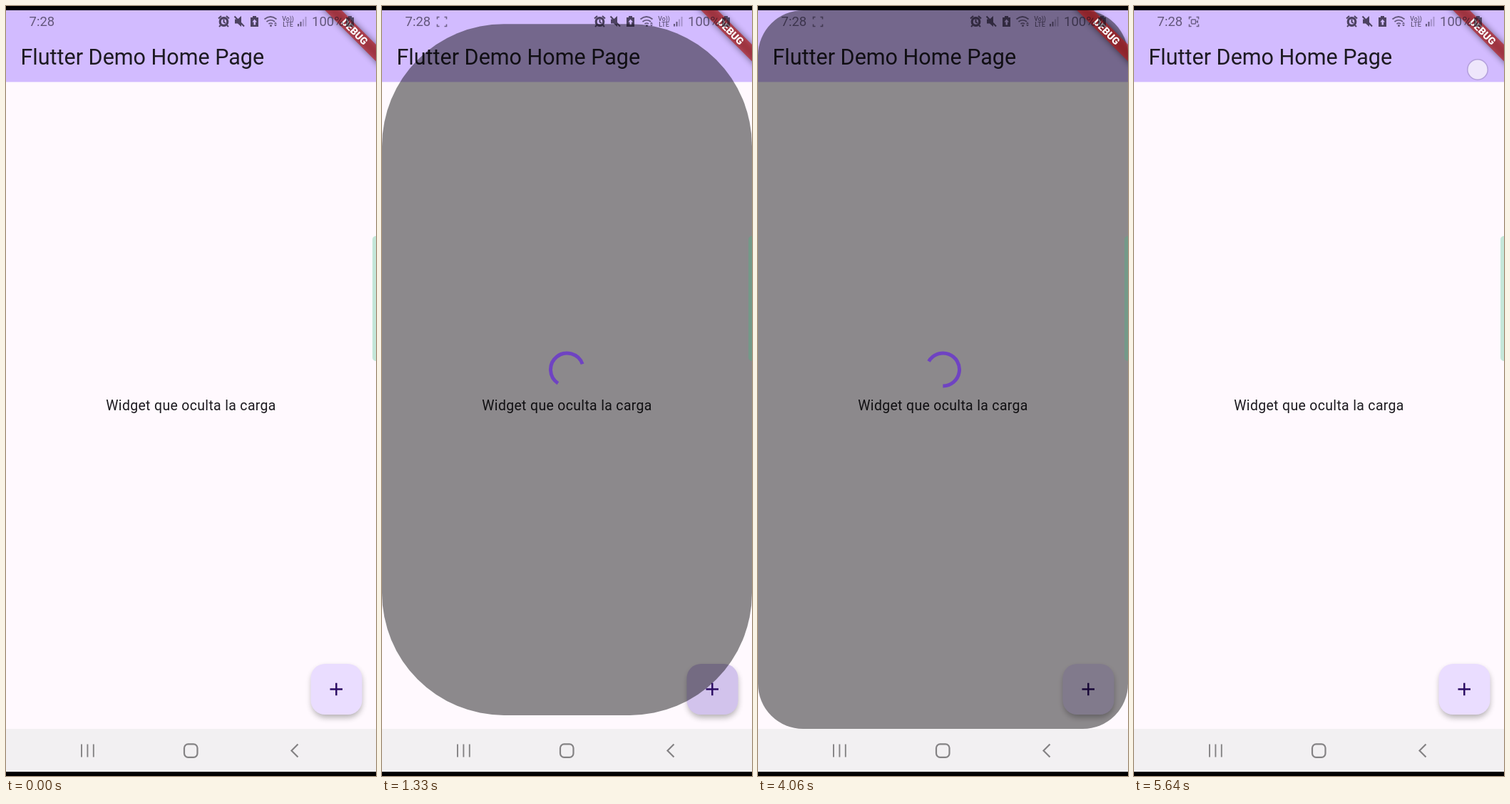
Animation of 519 by 1078 pixels, one loop 5.67 s. Source, as an HTML page:

```html
<!DOCTYPE html>
<html lang="es">
<head>
<meta charset="utf-8">
<title>Flutter Demo Home Page</title>
<style>
  html, body { margin: 0; width: 100%; height: 100%; overflow: hidden; background: #000; }
  svg { display: block; width: 519px; height: 1078px; font-family: Roboto, sans-serif; }
  .line { fill: none; stroke: currentColor; }
  #status { color: #15101f; fill: #15101f; }
  #nav { color: #848284; }
</style>
</head>
<body>
<svg viewBox="0 0 519 1078">
  <defs>
    <clipPath id="reveal"><rect id="hole"/></clipPath>
    <clipPath id="app"><rect y="6" width="519" height="1006"/></clipPath>
    <filter id="soft" x="-40%" y="-40%" width="180%" height="180%"><feGaussianBlur stdDeviation="4"/></filter>
    <filter id="glow" x="-20%" y="-150%" width="140%" height="400%"><feGaussianBlur stdDeviation="5"/></filter>
  </defs>

  <rect width="519" height="1078"/>
  <rect y="6" width="519" height="1006" fill="#fff9fe"/>
  <rect y="6" width="519" height="100.4" fill="#d2bbff"/>
  <text x="20.5" y="82" font-size="30.5" fill="#1d1a22">Flutter Demo Home Page</text>
  <text x="259.5" y="566" font-size="19.45" letter-spacing=".35" text-anchor="middle" fill="#1d1b20">Widget que oculta la carga</text>

  <rect x="429" y="926" width="70" height="70" rx="20" opacity=".3" filter="url(#soft)"/>
  <rect x="427.500" y="921" width="72" height="71" rx="20" fill="#eaddff"/>
  <rect id="ink" x="427.500" y="921" width="72" height="71" rx="20" fill="#21005d" opacity="0"/>
  <path d="M454.500 956.500h17.500M463.300 947.700v17.500" stroke="#2c0d64" stroke-width="2.500"/>

  <g clip-path="url(#app)">
    <g clip-path="url(#reveal)">
      <rect y="6" width="519" height="1006" opacity=".45"/>
      <path id="arc" fill="none" stroke="#6f43c2" stroke-width="5"/>
    </g>
    <g transform="translate(519 6) rotate(45)">
      <rect x="-80" y="34" width="160" height="16.600" opacity=".5" filter="url(#glow)"/>
      <rect x="-80" y="34" width="160" height="16.600" fill="#b71c1c" fill-opacity=".66"/>
      <text y="47.300" font-size="14.100" font-weight="900" text-anchor="middle" fill="#fff">DEBUG</text>
    </g>
  </g>
  <path d="M519 322h-1q-4 1-4 5v165q0 4 4 5h1z" fill="#3cbe82" fill-opacity=".3"/>

  <g id="status">
    <g opacity=".58">
      <text x="32.5" y="28.3" font-size="18.5">7:28</text>
      <text x="429" y="28.3" font-size="18.5">100%</text>
    </g>
    <g id="rec" opacity=".52" stroke-width="1.6">
      <path class="line" d="M77.500 18.500v-3h3M87.500 15.500h3v3M90.500 25.500v3h-3M80.500 28.500h-3v-3"/>
      <g id="cam"><rect class="line" x="80.500" y="19" width="6" height="6" rx="1"/><path d="M87 22l3-2.500v5z"/></g>
    </g>
    <g opacity=".7">
      <circle class="line" cx="305.5" cy="22" r="5.300" stroke-width="3.200"/>
      <path class="line" d="M305.500 18.500v4l2.500 1.500M298 17.500l4-3.500M313 17.500l-4-3.500M301 27l-2 2M310 27l2 2" stroke-width="2"/>
      <path d="M321 18.500h4l5-4.500v15l-5-4.500h-4z"/>
      <path class="line" d="M320.500 14.500l13.500 14" stroke-width="2"/>
      <path fill-rule="evenodd" d="M346 14h5v2h3v13h-11v-13h3zM348.500 18.500l-3 4h2v4h2.500v-4h2z"/>
    </g>
    <g opacity=".58">
      <path class="line" d="M362.500 18.500q8.500-7 17 0M365.500 22q6-4.500 11.500 0M368.500 25q3-2 5.500 0" stroke-width="1.700"/>
      <circle cx="371.500" cy="27.500" r="1.500"/>
      <path d="M376 25l2-2.500 2 2.500zM376 26l2 2.500 2-2.500z"/>
      <text x="395.500" y="20.500" font-size="8.800" font-weight="500" text-anchor="middle">Vo))</text>
      <text x="395.500" y="28.600" font-size="9" font-weight="500" text-anchor="middle">LTE</text>
      <path d="M409 25h2v3.500h-2zM412.500 22h2v6.500h-2z"/>
      <path d="M416 18.500h2v10h-2zM419.500 15h2v13.500h-2z" opacity=".4"/>
    </g>
    <path opacity=".62" fill-rule="evenodd" d="M480 14h5v2h3v13h-11v-13h3zM483.500 18l-3.500 5h2.200l-.7 4 3.500-5h-2.200z"/>
  </g>

  <g id="nav">
    <rect y="1012" width="519" height="60" fill="#f2f0f2"/>
    <path class="line" d="M106 1033.500v18M114.400 1033.500v18M122.800 1033.500v18" stroke-width="1.900"/>
    <rect class="line" x="250" y="1033.300" width="18.500" height="18.500" rx="5.500" stroke-width="2.200"/>
    <path class="line" d="M409.500 1033.500l-9 9 9 9" stroke-width="2.200"/>
  </g>
  <g id="touch" visibility="hidden">
    <circle r="15" fill="#6d6187" opacity=".3"/>
    <circle r="13.500" fill="#eee6fb"/>
  </g>
</svg>

<script>
const LOOP = 5670;
const $ = id => document.getElementById(id);
const set = (id, attrs) => { for (const k in attrs) $(id).setAttribute(k, attrs[k]); };
const clamp = v => Math.min(1, Math.max(0, v));
const ramp = (t, from, to) => clamp((t - from) / (to - from));
const show = on => on ? 'visible' : 'hidden';

// cubic-bezier(.4, 0, .2, 1)
function ease(x) {
  let lo = 0, hi = 1;
  for (let i = 0; i < 24; i++) {
    const s = (lo + hi) / 2, u = 1 - s;
    if (1.2 * u * u * s + .6 * u * s * s + s * s * s < x) lo = s; else hi = s;
  }
  return 3 * (1 - lo) * lo * lo + lo ** 3;
}

// The scrim grows as a circle, then loses its rounding at the screen edges.
function drawScrim(t) {
  const p = ramp(t, 1133.5, 1433.5) - ramp(t, 4023, 4323);
  const size = 1470 * p, w = Math.min(519, size), h = Math.min(1006, size);
  const r = Math.min(500 * (1 - p), w / 2, h / 2);
  set('hole', { x: 259.5 - w / 2, y: 509 - h / 2, width: w, height: h, rx: r, ry: r });
}

// Material indeterminate spinner: 1333 ms sweep, 2222 ms rotation.
function drawSpinner(t) {
  const phase = (t + 4350) / 1333 % 1;
  const head = 270 * ease(clamp(phase * 2)), tail = 270 * ease(clamp(phase * 2 - 1));
  const turn = 189.5 + (t - 1330) / 2222 * 360;
  const start = -90 + tail + phase * 90 + turn;
  const sweep = Math.max(head - tail, .1);
  const point = deg => {
    const a = deg * Math.PI / 180;
    return `${259.5 + 23 * Math.cos(a)} ${509 + 23 * Math.sin(a)}`;
  };
  set('arc', { d: `M${point(start)}A23 23 0 ${+(sweep > 180)} 1 ${point(start + sweep)}` });
}

function draw(t) {
  drawScrim(t);
  drawSpinner(t);
  set('ink', { opacity: .12 * (ramp(t, 1080, 1180) - ramp(t, 1330, 1500)) });
  set('rec', { visibility: show(t >= 450) });
  set('cam', { opacity: +(t % 1000 >= 500) });
  set('touch', {
    visibility: show(t >= 5580),
    transform: `translate(482 ${45 + 44 * ramp(t, 5580, 5640)})`
  });
}

function tick() {
  draw(performance.now() % LOOP);
  requestAnimationFrame(tick);
}
tick();
</script>
</body>
</html>
```
